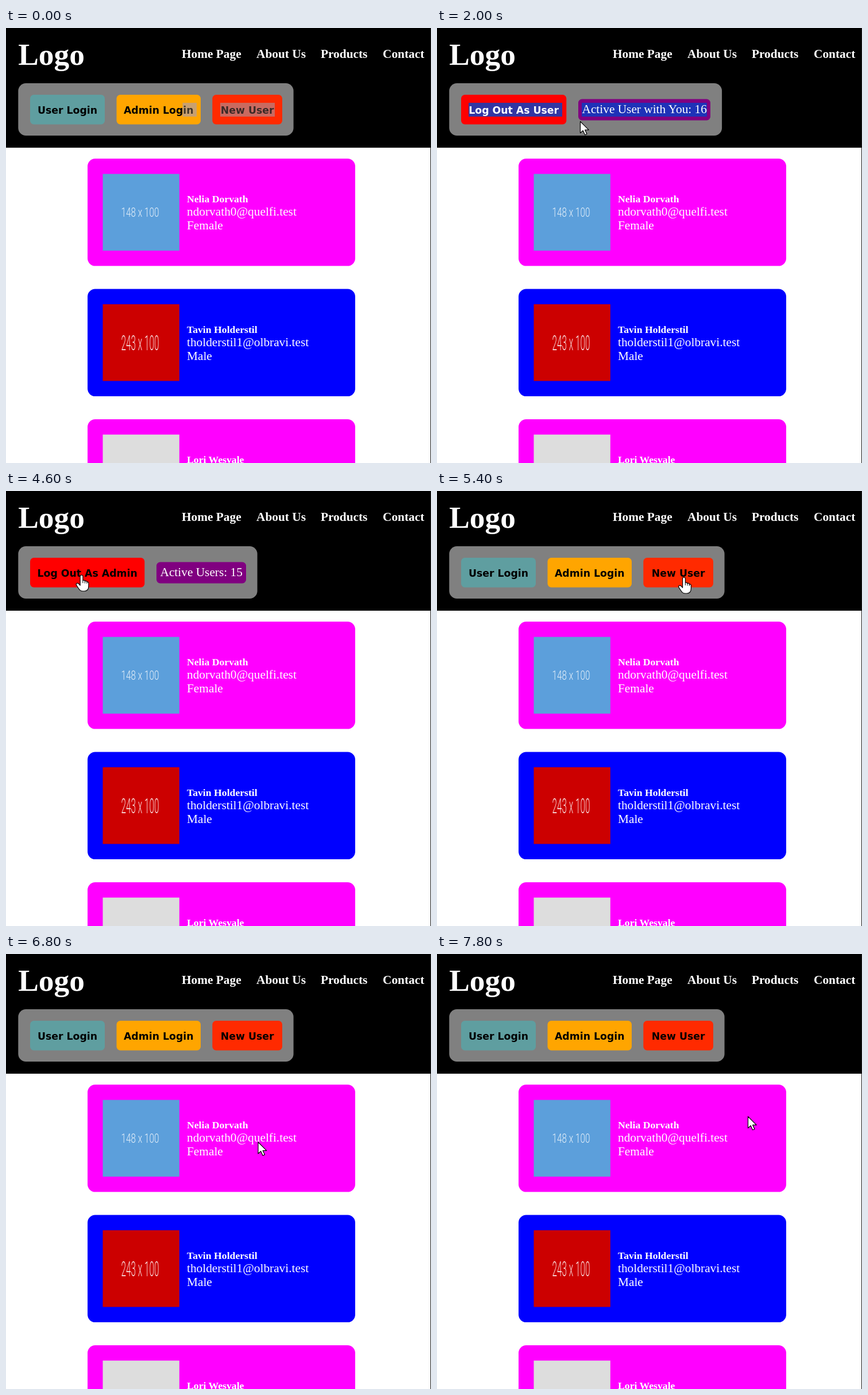
Recreate the animation shown at these times as an HTML page. Size 740 by 756 pixels, loop 8 s.

```html
<!DOCTYPE html>
<html lang="en">
<head>
<meta charset="utf-8">
<title>User cards</title>
<style>
html, body { margin: 0; width: 100%; height: 100%; overflow: hidden; background: #fff; }
svg { display: block; width: 740px; height: 756px; }
text { font-family: "Liberation Serif", "Times New Roman", serif; font-size: 21.333px; white-space: pre; }
.logo { font-size: 53.333px; font-weight: bold; }
.nav { font-weight: bold; }
.name { font-size: 17.7px; font-weight: bold; }
.btn { font-family: "DejaVu Sans", sans-serif; font-size: 17.3px; font-weight: bold; text-anchor: middle; }
.thumb { font-family: Roboto, sans-serif; font-weight: 300; text-anchor: middle; }
</style>
</head>
<body>
<svg id="stage" viewBox="0 0 740 756">
  <g id="page"></g>
  <g id="panel"></g>
  <g id="modal"></g>
  <rect x="739" width="1" height="756" fill="#1c1c1c"/>
  <g id="cursor" fill="#fff" stroke="#000" stroke-width="1.2" stroke-linejoin="round">
    <path id="arrow" d="M.5 .5V20.5L5.2 16.3L8.6 23.7L12 22.2L8.7 15.2H15.2Z"/>
    <g id="hand">
      <path d="M-2.4 2.4Q-2.4 0 0 0T2.4 2.4V9.6Q4.6 8 6 10.6Q8.3 9.4 9.4 12Q12.4 11.6 12.4 14.6V19Q12.4 28 5 28H2Q-2.4 28 -5 23.5L-9 17.6Q-10 15 -8 14.2Q-6 13.6 -4 16.2L-2.4 18Z"/>
      <path d="M2.4 9.6V14M6 10.6V14.5M9.4 12V15" fill="none" stroke-width="1"/>
    </g>
  </g>
</svg>
<script>
const LOOP = 8000, STEP = 200;
const $ = id => document.getElementById(id);

const rect = (x, y, w, h, fill, r = 0, extra = "") =>
  `<rect x="${x}" y="${y}" width="${w}" height="${h}" rx="${r}" fill="${fill}" ${extra}/>`;
const text = (x, y, s, fill = "#fff", cls = "") =>
  `<text x="${x}" y="${y}" fill="${fill}" class="${cls}">${s}</text>`;
const mark = (x, w, fill) => rect(x, 130, w, 24, fill);

// Static page
function thumb(y, fill, w, size, base) {
  let out = rect(168.5, y, 133.3, 133.3, fill);
  if (w) out += `<g transform="translate(233.5 ${base}) scale(${133.3 / w} 1.333)" opacity=".85">` +
    `<text class="thumb" style="font-size:${size}px" fill="#fff">${w} x 100</text></g>`;
  return out;
}

function card(i, fill, pic, name, mail, sex) {
  const y = 227 + i * 226.5;
  return rect(142, y, 466, 186.6, fill, 13.3) + thumb(y + 26.6, ...pic) +
    text(315, y + 76, name, "#fff", "name") +
    text(315, y + 99, mail) + text(315, y + 123, sex);
}

$("page").innerHTML = rect(0, 0, 740, 756, "#fff") + rect(0, 0, 740, 208, "#000") +
  text(21.3, 64, "Logo", "#fff", "logo") +
  [[306, "Home Page"], [436, "About Us"], [548, "Products"], [656, "Contact"]]
    .map(([x, s]) => text(x, 52, s, "#fff", "nav")).join("") +
  card(0, "#f0f", ["#5c9fdb", 148, 17, 328], "Nelia Dorvath", "ndorvath0@quelfi.test", "Female") +
  card(1, "#00f", ["#c00", 243, 28, 560], "Tavin Holderstil", "tholderstil1@olbravi.test", "Male") +
  card(2, "#f0f", ["#ddd"], "Lori Wesvale", "", "");

// Buttons: x, y, width, fill, label, then x, width and colour of the text selection
const BTN_H = 51.5;
const VIEWS = {
  login: {
    width: 479.3,
    buttons: [
      [42, 116, 130, "#5f9ea0", "User Login", 55, 110, "#1259c6"],
      [192.5, 116, 146.5, "#ffa500", "Admin Login", 206, 126, "#33589f"],
      [359.3, 116, 121.7, "#ff2a00", "New User", 373, 95, "#3a3ba2"]
    ]
  },
  user: {
    width: 474.8,
    buttons: [[42, 116, 183.3, "#f00", "Log Out As User", 55, 163, "#3236a3"]],
    badge: [246, 230, "Active User with You: 16", 252, 218]
  },
  admin: {
    width: 416.3,
    buttons: [[42, 116, 199.3, "#f00", "Log Out As Admin", 55, 173, "#3236a3"]],
    badge: [262, 156, "Active Users: 15", 268, 144]
  }
};
const DIALOG = [
  [276, 400.3, 221, "#008000", "Save"],
  [276, 465, 221, "#ff2a00", "Close"]
];

function button([x, y, w, fill, label, sx, sw, sc], sel) {
  const blue = sel === "blue";
  let under = "", ink = blue ? "#fff" : "#000", words = label;
  if (blue) under = mark(sx, sw, sc);
  if (sel === "grey" && label === "New User") {
    under = mark(sx, sw, "#c96a60");
    ink = "#3a2a27";
  }
  if (sel === "grey" && label === "Admin Login") {
    under = mark(307.5, 24.5, "#c8a070");
    words = 'Admin Log<tspan fill="#40362a">in</tspan>';
  }
  return rect(x, y, w, BTN_H, fill, 6.5) + under + text(x + w / 2, y + 32.7, words, ink, "btn");
}

function panel(view, sel) {
  const { width, buttons, badge } = VIEWS[view];
  let out = rect(21.3, 96, width, 91, "#808080", 13.3) + buttons.map(b => button(b, sel)).join("");
  if (badge) {
    const [x, w, label, tx, tw] = badge;
    out += rect(x, 123.5, w, 37, "#800080", 6.5) +
      (sel === "blue" ? mark(tx, tw, "#1e32b8") : "") + text(tx + .5, 148, label);
  }
  return out;
}

const field = y => rect(276.5, y, 220, 25, "#fff", 2.7, 'stroke="#767676"');
$("modal").innerHTML = rect(0, 0, 740, 756, "rgba(182,182,182,.7)") +
  rect(209.5, 181, 354, 402, "#fff", 13.3) +
  text(275.7, 266, "Name", "#000") + field(285.3) +
  text(275.7, 342.3, "Last Name", "#000") + field(361.5) +
  DIALOG.map(b => button(b)).join("");

// Timed states: each row holds from its time on
const SHOW = [[0, "login"], [1200, "user"], [2600, "login"], [3200, "admin"], [4800, "login"]];
const SELECT = [[0, "grey"], [800, ""], [1800, "blue"], [3200, ""]];
const OPEN = [[0, false], [5600, true], [6600, false], [7200, true], [7800, false]];
const PATH = [
  [600, 330, 420], [1000, 120, 148], [1400, 130, 150], [2000, 249, 162], [2400, 140, 148],
  [2600, 140, 148], [3000, 257.5, 148], [3200, 257.5, 148], [4200, 131.5, 146], [4800, 131.5, 146],
  [5400, 430, 150], [5600, 430, 150], [6200, 428, 503], [6600, 428, 503], [7000, 449, 150],
  [7200, 449, 150], [7600, 440, 490], [7800, 541, 282]
];

const at = (rows, t) => rows.filter(r => r[0] <= t).pop();

function pointer(t) {
  const i = PATH.indexOf(at(PATH, t));
  const [t0, x0, y0] = PATH[i], [t1, x1, y1] = PATH[i + 1] || [LOOP, x0, y0];
  const u = (t - t0) / (t1 - t0), k = u * u * (3 - 2 * u);
  return [x0 + (x1 - x0) * k, y0 + (y1 - y0) * k];
}

function draw(t) {
  const view = at(SHOW, t)[1], open = at(OPEN, t)[1];
  $("panel").innerHTML = panel(view, at(SELECT, t)[1]);
  $("modal").style.display = open ? "" : "none";
  const visible = t >= PATH[0][0];
  $("cursor").style.display = visible ? "" : "none";
  if (!visible) return;
  const [px, py] = pointer(t);
  const over = (open ? DIALOG : VIEWS[view].buttons)
    .some(([x, y, w]) => px > x && px < x + w && py > y && py < y + BTN_H);
  $("cursor").setAttribute("transform", `translate(${px} ${py})`);
  $("hand").style.display = over ? "" : "none";
  $("arrow").style.display = over ? "none" : "";
}

const start = performance.now();
let last = -1;
function tick() {
  const t = Math.floor((performance.now() - start) % LOOP / STEP) * STEP;
  if (t !== last) draw(last = t);
  requestAnimationFrame(tick);
}
tick();
</script>
</body>
</html>
```
